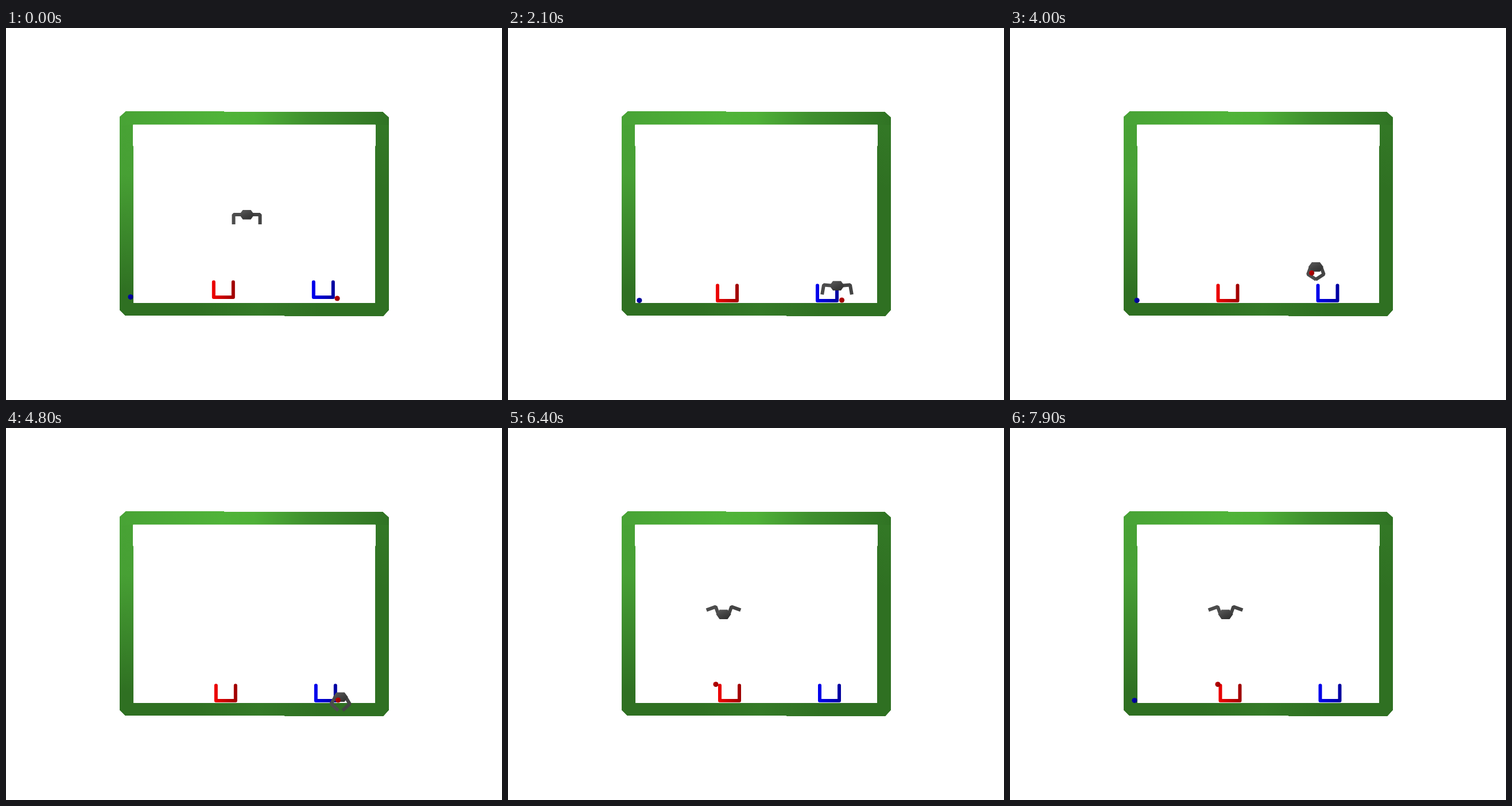
An HTML page with a canvas that plays this animation: 864 by 648 pixels, repeating every 8 s.

```html
<!DOCTYPE html>
<html lang="en">
<head>
<meta charset="utf-8">
<title>Gripper and cups</title>
<style>
html, body { margin: 0; width: 100%; height: 100%; overflow: hidden; background: #fff; }
canvas { display: block; }
</style>
</head>
<body>
<canvas id="stage" width="864" height="648"></canvas>
<script>
const ctx = document.getElementById('stage').getContext('2d');
const { PI, sin, cos, min, max, floor } = Math;
const STEP = 100, STEPS = 80;
const starts = [0, 10, 19, 27, 34, 46, 52, 58, 65, 73, STEPS];

// Gripper place at phases 0..9: wait, raise, reach, grab, carry, release
const path = [[419.5, 325], [445, 308], [557, 435], [585, 459], [581, 475],
  [528, 410], [455, 350], [388.5, 330], [374, 326], [375.5, 324.5]];
const RELEASE = 7.2;

// Angles of the upper arm and the finger, in degrees
const rest = [0, 90], open = [-70, 20], reach = [22, 105], closed = [70, 147];
const poses = [rest, open, open, reach, closed, closed, closed, closed, open, open];

const clamp = v => max(0, min(1, v));
const mix = (a, b, k) => a.map((v, j) => v + (b[j] - v) * k);

function between(keys, u, ease = k => k) {
  const i = min(floor(u), keys.length - 2);
  return mix(keys[i], keys[i + 1], ease(u - i));
}

function gradient(x0, y0, x1, y1, ...stops) {
  const g = ctx.createLinearGradient(x0, y0, x1, y1);
  stops.forEach(([at, color]) => g.addColorStop(at, color));
  return g;
}

function trace(points, close) {
  ctx.beginPath();
  points.forEach(([x, y]) => ctx.lineTo(x, y));
  if (close) ctx.closePath();
}

function rect(x, y, w, h, fill) {
  ctx.fillStyle = fill;
  ctx.fillRect(x, y, w, h);
}

function drawWall() {
  const dark = '#2f7022', left = '#48a335';
  ctx.save();
  trace([[209, 145], [380, 145], [380, 146], [656, 146], [667, 156], [667, 491], [657, 502],
    [485, 502], [485, 501], [208, 501], [198, 491], [198, 155]], true);
  ctx.clip();
  rect(198, 145, 469, 357, dark);
  rect(198, 145, 24, 357, gradient(0, 145, 0, 460, [0, left], [.35, '#47a034'], [1, dark]));
  rect(642, 145, 25, 357, gradient(0, 145, 0, 280, [0, '#347a27'], [1, dark]));
  rect(198, 479, 469, 23, gradient(330, 0, 550, 0, [0, dark], [.5, '#347a27'], [1, dark]));
  rect(198, 145, 469, 24, gradient(198, 0, 667, 0,
    [0, left], [.38, '#50b439'], [.5, '#4fb138'], [.7, '#3f902e'], [1, '#307324']));
  ctx.restore();
  rect(222, 168.5, 421, 310.5, '#fff');
  rect(221, 168.5, 423, 37, '#fff');
}

function drawCup(x, y, light, dark) {
  trace([[x, y - 26.5], [x, y], [x + 34, y], [x + 34, y - 26.5]]);
  ctx.lineWidth = 6;
  ctx.lineCap = ctx.lineJoin = 'round';
  ctx.strokeStyle = gradient(x - 3, 0, x + 37, 0, [0, light], [1, dark]);
  ctx.stroke();
}

function drawBall(x, y, light, dark) {
  ctx.beginPath();
  ctx.arc(x, y, 4.6, 0, 2 * PI);
  ctx.fillStyle = gradient(x - 4, y - 4, x + 4, y + 4, [0, light], [1, dark]);
  ctx.fill();
}

function drawGripper(x, y, pose) {
  const [upper, finger] = pose.map(a => a * PI / 180);
  const elbow = [9 + 14 * cos(upper), 14 * sin(upper)];
  const tip = [elbow[0] + 17 * cos(finger), elbow[1] + 17 * sin(finger)];
  ctx.save();
  ctx.translate(x, y);
  ctx.lineWidth = 6;
  ctx.lineCap = 'butt';
  ctx.lineJoin = 'bevel';
  for (const side of [-1, 1]) {
    trace([[9, 0], elbow, tip].map(([px, py]) => [side * px, py]));
    ctx.strokeStyle = side < 0 ? '#4c4c4c' : '#444';
    ctx.stroke();
  }
  trace([[-7, -8], [7, -8], [13, 0], [7, 8.5], [-7, 8.5], [-13, 0]], true);
  ctx.fillStyle = gradient(-4, -8, 4, 8, [0, '#555'], [.5, '#424242'], [1, '#333']);
  ctx.fill();
  ctx.restore();
}

// The red ball rests, hangs in the closed fingers, then falls onto the cup rim
function ballPlace(u, home, drop) {
  if (u < 4) return [home, 474 - drop];
  const [x, y] = between(path, min(u, RELEASE));
  const grip = clamp(u - 4), fall = max(0, u - RELEASE);
  return [max(362, x - 8 * grip - 20 * fall), min(446.5, y + 12 * grip + 195 * fall * fall)];
}

function draw(step) {
  const i = starts.findIndex(s => s > step) - 1;
  const u = 9 * (step - starts[i]) / (starts[i + 1] - 1 - starts[i]);
  const drop = 6 * max(0, 1 - u);

  // Every episode starts with slightly moved objects
  const sway = .8 + .8 * i + 2.7 * sin(2 * PI * i / 5);
  const redHome = 580 - 3 * cos(i * PI / 3);
  const blueX = 217 + 12 * sin(2 * PI * i / 9);
  const [x, y] = between(path, u);
  const release = k => clamp((k - .25) * 2.2);

  rect(0, 0, 864, 648, '#fff');
  drawWall();
  drawCup(361 + sway, 475 - drop, '#f00000', '#9c0000');
  drawCup(535 + sway, 475 - drop, '#0000f0', '#00009c');
  // Left of this line the wall hides the ball
  if (blueX > 213) drawBall(blueX, 474.5 - drop, '#0000b4', '#000080');
  drawGripper(x, y, between(poses, u, release));
  drawBall(...ballPlace(u, redHome, drop / 2), '#c00000', '#900000');
}

const start = performance.now();
function tick() {
  draw(floor((performance.now() - start) / STEP) % STEPS);
  requestAnimationFrame(tick);
}
tick();
</script>
</body>
</html>
```
